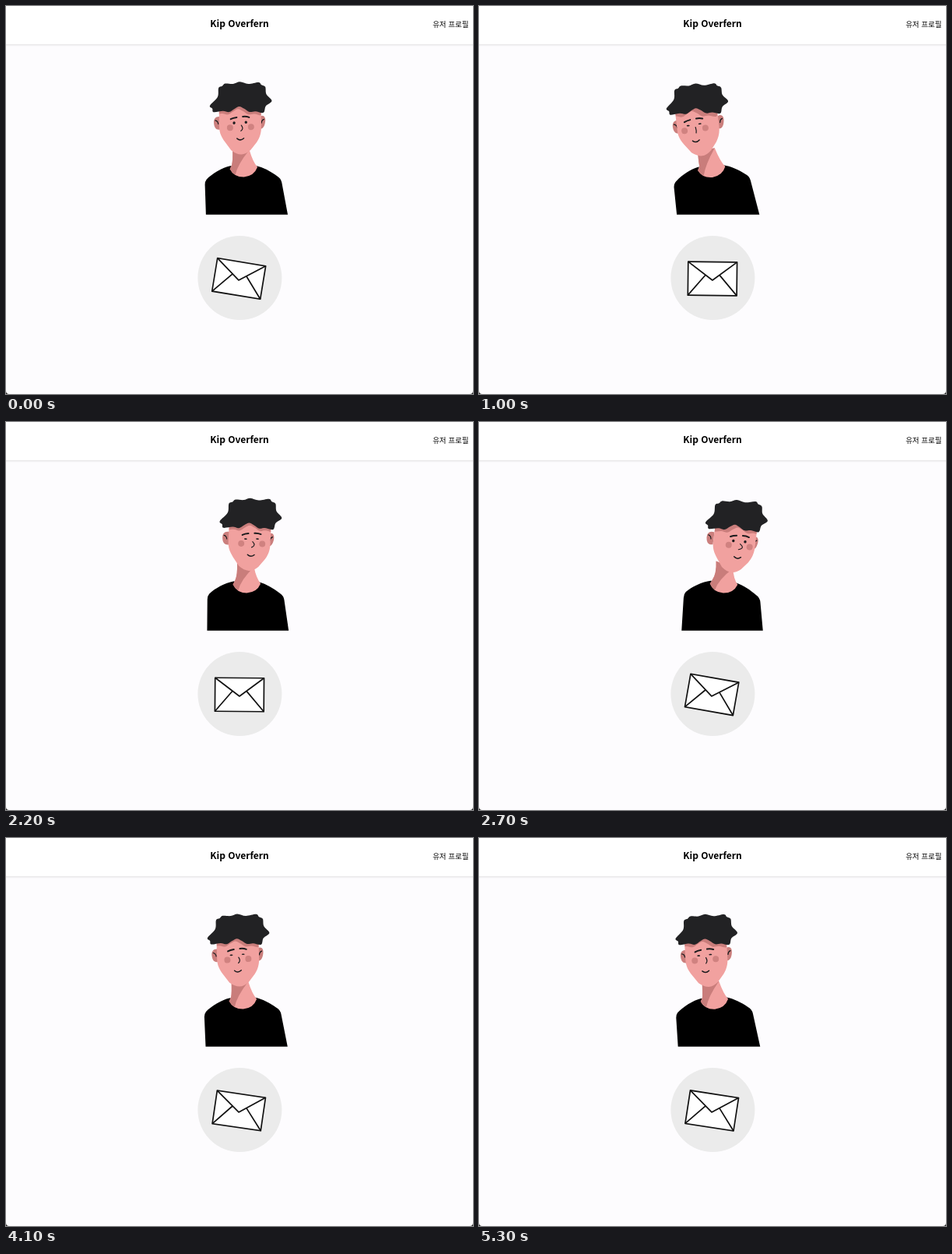
Recreate the animation shown at these times as an HTML page. Size 600 by 498 pixels, loop 5400 ms.

```html
<!DOCTYPE html>
<html lang="ko">
<head>
<meta charset="utf-8">
<title>Profile</title>
<style>
  html, body { margin: 0; width: 100%; height: 100%; overflow: hidden; background: #fdfcfe; }
  svg { display: block; width: 600px; height: 498px; }
  text { font-family: "Noto Sans CJK KR", "Noto Sans CJK", "Noto Sans", sans-serif; fill: #000; }
  .line { fill: none; stroke: #1b1b1d; stroke-linecap: round; stroke-linejoin: round; }
</style>
</head>
<body>
<svg viewBox="0 0 600 498">
  <defs>
    <linearGradient id="fade" x1="0" y1="0" x2="0" y2="1">
      <stop offset="0" stop-color="#000" stop-opacity=".09"/>
      <stop offset="1" stop-color="#000" stop-opacity="0"/>
    </linearGradient>
    <clipPath id="bust"><rect x="200" y="80" width="200" height="187.7"/></clipPath>
    <path id="face" d="M274 122 V154 C274 163 277 168 281 174 L289 185 Q296 190.500 302 190.500
      Q308 190.500 314 185 L322 175 C326 169 328 163 328 155 V122 Z"/>
    <clipPath id="faceClip"><use href="#face"/></clipPath>
  </defs>

  <rect width="600" height="498" fill="#fdfcfe"/>
  <rect width="600" height="49" fill="#fff"/>
  <rect y="49" width="600" height="3" fill="url(#fade)"/>
  <text x="300" y="27" font-size="12" font-weight="700" text-anchor="middle">Kip Overfern</text>
  <text x="594.5" y="26.8" font-size="9.5" font-weight="500" text-anchor="end">유저 프로필</text>
  <path d="M0 494 Q0 498 4 498 H0 Z M600 494 Q600 498 596 498 H600 Z" fill="#222"/>

  <g clip-path="url(#bust)">
    <path id="body" d="M289 205 C279 207 265 215 258.500 222 Q256 225 256.300 230 L258 300 H368
      L355 227 Q354 221.500 349 218.500 C341 212.500 331 207 322 205 Z"/>
    <path id="neck" fill="#f1a19f"/>
    <path id="neckShade" fill="#c97d7b"/>
    <g id="head">
      <g transform="translate(2)">
        <g fill="#cb7f7d">
          <path d="M276 142 C270 140.500 266.500 144 267 150 C267.500 156 270 159.500 276 158 Z"/>
          <path d="M326 142 C331 139.500 334 143 333 149 C332 155.500 329.500 159 325 158 Z"/>
        </g>
        <path class="line" stroke-width="1.200" d="M268.800 146.500 Q272 147 272.600 151 M331.300 145.800 Q328.300 146.800 328 150.500"/>
        <g id="front">
          <use href="#face" fill="#f1a19f"/>
          <g clip-path="url(#faceClip)"><path id="hairShade" fill="#c97d7b"/></g>
        </g>
        <g id="features">
          <circle cx="288" cy="156" r="4" fill="#d08280"/>
          <circle cx="315" cy="155.300" r="4" fill="#d08280"/>
          <path class="line" stroke-width="2" d="M289 145 Q292 143.400 296.700 142.800 M304.500 142 Q309 141.500 312.700 143"/>
          <ellipse class="eye" cx="293.300" cy="150" fill="#1b1b1d"/>
          <ellipse class="eye" cx="308.500" cy="149.300" fill="#1b1b1d"/>
          <path id="nose" class="line" stroke-width="1.200"/>
          <path class="line" stroke-width="1.500" d="M296.800 170 Q301 173.800 305.500 169.800"/>
        </g>
        <path id="hair" fill="#222224"/>
      </g>
    </g>
  </g>

  <circle cx="300.400" cy="349" r="54" fill="#ebebeb"/>
  <g id="mail" stroke="#111" stroke-width="1.700" stroke-linejoin="round" fill="none">
    <rect x="268.600" y="328.500" width="62.800" height="43" fill="#fff"/>
    <path d="M268.600 328.500 L300 352 L331.400 328.500 M268.600 371.500 L291 345.300 M331.400 371.500 L309 345.300"/>
  </g>
</svg>
<script>
const LOOP = 5400, CYCLE = 4000, FRAME = 100;
const $ = id => document.getElementById(id);
const set = (id, name, value) => $(id).setAttribute(name, value);
const eyes = document.querySelectorAll('.eye');

// Ease-in-out on 0..1, flat outside
function ease(x) {
  const v = Math.min(1, Math.max(0, x)), a = v ** 1.74;
  return a / (a + (1 - v) ** 1.74);
}

// Position in the cycle, counted in the given number of equal steps
const steps = (time, count) => (time + CYCLE) % CYCLE / CYCLE * count;

// Tips of the curls; the dips between them are pulled to the middle, wide gaps more
function curls() {
  const tips = [
    [262.3, 127.5], [273.5, 105], [282, 99.5], [301, 97.3], [325, 98], [333.5, 104],
    [341.8, 122], [331, 137], [313, 136], [300, 129], [287, 136], [267, 136]
  ];
  const middle = [302, 118];
  return tips.flatMap((a, i) => {
    const b = tips[(i + 1) % tips.length];
    const pull = 0.0002 * Math.hypot(b[0] - a[0], b[1] - a[1]) ** 2;
    return [a, a.map((v, k) => (v + b[k]) / 2 * (1 - pull) + middle[k] * pull)];
  });
}

// Closed Catmull-Rom curve through the points
function smooth(pts) {
  const n = pts.length, at = i => pts[(i + n) % n];
  let d = 'M' + pts[0];
  for (let i = 0; i < n; i++) {
    const [a, b, c, e] = [at(i - 1), at(i), at(i + 1), at(i + 2)];
    const p = b.map((v, k) => v + (c[k] - a[k]) / 6);
    const q = c.map((v, k) => v - (e[k] - b[k]) / 6);
    d += `C${p} ${q} ${c}`;
  }
  return d + 'Z';
}

// The lower end follows the body, the upper end the head
function drawNeck(s) {
  const r = 5 * s * Math.PI / 180, c = Math.cos(r), k = Math.sin(r);
  const low = (x, y) => {
    const dx = x - 308.5, dy = y - 304;
    return [309 + dx * c - dy * k, 304 + dx * k + dy * c];
  };
  const top = (x, y, lift) => [x + 1 + 12.5 * s, y + lift * s];
  const left = top(291.3, 183, -4.5), right = top(313, 185, 3);
  const side = `M${left} Q${top(292, 197, -2)} ${low(290.5, 204)} L${low(288, 209)}`;
  set('neck', 'd', `${side} Q${low(293, 219.5)} ${low(306, 219.5)} Q${low(319, 218.5)} ${low(323.5, 207)}
    Q${low(317.5, 200)} ${right} Z`);
  set('neckShade', 'd', `${side} Q${low(290.5, 214)} ${low(295, 216.5)} Q${low(298, 203)} ${right} Z`);
}

function draw(time) {
  const t = Math.floor(time % LOOP / FRAME) * FRAME;

  // Sway: left, middle, right, middle
  const q = steps(t + 225, 4);
  const s = (q < 2 ? -1 : 1) * ease(1 - Math.abs(q % 2 - 1));

  set('body', 'transform', `rotate(${5 * s} 309 304)`);
  drawNeck(s);
  set('head', 'transform', `translate(${0.5 + 18 * s} ${2.2 * s * s}) rotate(${7.3 * s} 303 190)`);
  set('front', 'transform', `translate(${2 * s})`);
  const level = `rotate(${-4.5 * s} 302 118)`;
  set('hair', 'transform', level);
  set('hairShade', 'transform', `translate(${3 * s - 1} 3.2) ${level}`);
  set('features', 'transform', `translate(${7.8 * s + 0.5})`);

  const bulge = 2.4 + 2.4 * s;
  set('nose', 'd', `M302.5 153 Q${303 + bulge * 1.4} 157.5 ${302.6 - bulge * 0.3} 160.3`);

  const blink = t % 980, shut = blink > 10 && blink < 450;
  eyes.forEach(e => {
    e.setAttribute('rx', shut ? 2 : 1.7);
    e.setAttribute('ry', shut ? 0.8 : 1.8);
  });

  // Even shake, raised for one swing
  const k = steps(t - 38, 12);
  const tilt = 10 * (Math.cos(Math.PI * k) + ease(k - 1) * ease(4 - k));
  set('mail', 'transform', `rotate(${tilt} 300 345)`);
}

const hairPath = smooth(curls());
set('hair', 'd', hairPath);
set('hairShade', 'd', hairPath);

const start = performance.now();
function tick() {
  draw(performance.now() - start);
  requestAnimationFrame(tick);
}
tick();
</script>
</body>
</html>
```
